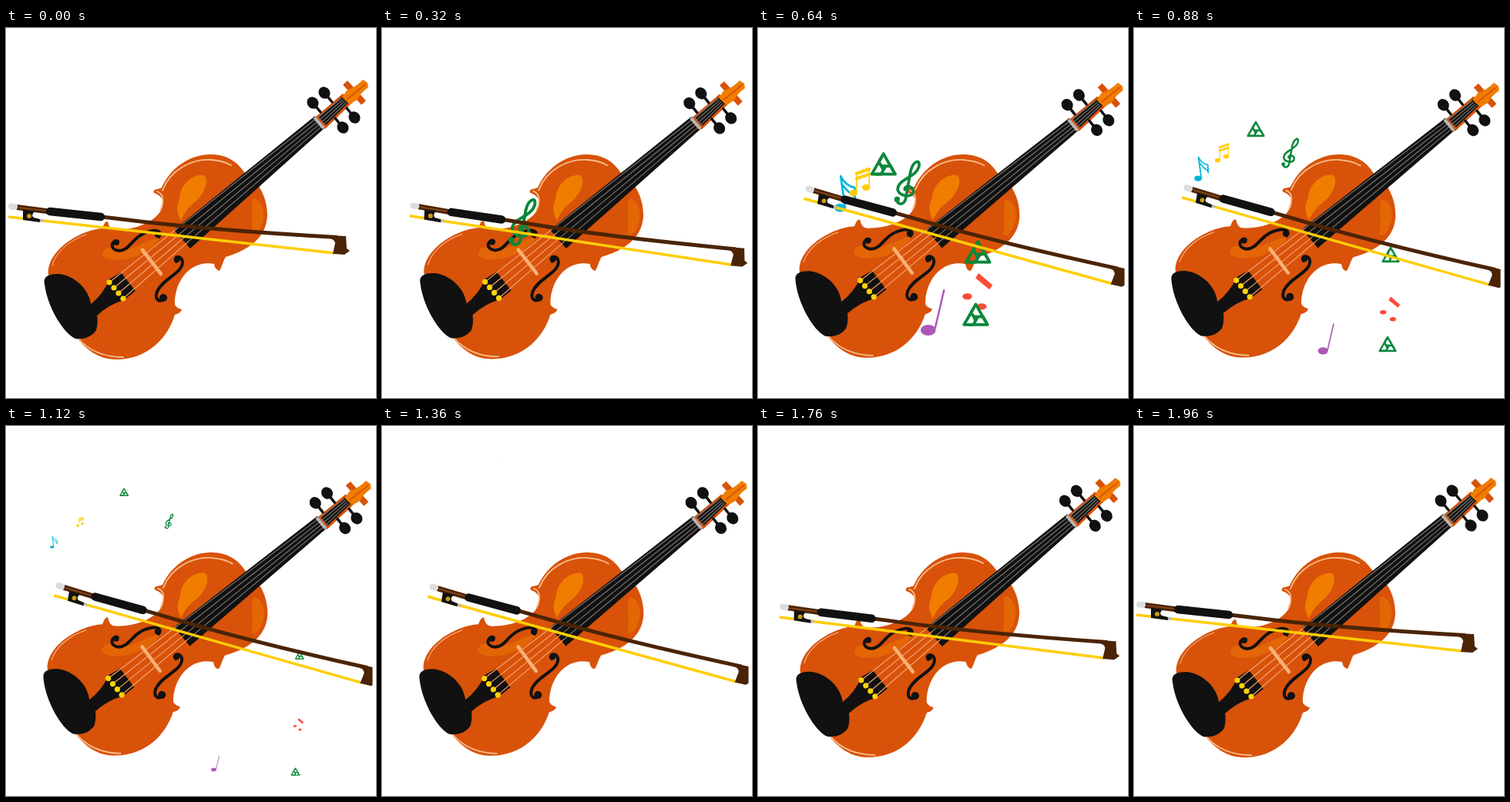
Recreate the animation shown at these times as an HTML page. Size 480x480 px, loop 2000 ms.

```html
<!DOCTYPE html>
<html lang="en">
<head>
<meta charset="utf-8">
<title>Violin</title>
<style>
  html, body { margin: 0; width: 100%; height: 100%; overflow: hidden; background: #fff; }
  svg { display: block; width: 100vw; height: 100vh; }
  .line { fill: none; stroke-linecap: round; stroke-linejoin: round; }
  .flat { stroke-linecap: butt; }
</style>
</head>
<body>
<svg viewBox="0 0 480 480">
  <defs>
    <clipPath id="edge"><rect width="475.5" height="480"/></clipPath>
    <path id="strand" class="line" d="M-3 -16L-18.7 10.8H-4L3 -1"/>
    <g id="knot" stroke="#0b873b" stroke-width="4.6">
      <use href="#strand"/>
      <use href="#strand" transform="rotate(120)"/>
      <use href="#strand" transform="rotate(240)"/>
    </g>
    <g id="clef" fill="#0b873b" transform="rotate(14)">
      <path class="line" stroke="#0b873b" stroke-width="4.5" d="M-11 31C-4 40 3 34 3 26L0 -18C0 -36 11 -42 11 -28C10 -10 -16 -2 -13 14C-9 25 13 23 12 12C10 3 -4 4 -2 12"/>
      <circle cx="-10" cy="30" r="4.5"/>
    </g>
    <g id="flagged" fill="#00b7dd">
      <ellipse cx="-9" cy="22" rx="9" ry="6.5"/>
      <path class="line" stroke="#00b7dd" stroke-width="3.2" d="M-1 22L-8 -28Q0 -12 14 -10L15 8M-5 -14Q4 -2 14 4"/>
    </g>
    <g id="beamed" fill="#ffcd05">
      <ellipse cx="-10" cy="16" rx="6.5" ry="5"/>
      <ellipse cx="10" cy="7" rx="6.5" ry="5"/>
      <path class="line" stroke="#ffcd05" stroke-width="5" d="M-5 -15L15 -22M-5 -7L15 -14"/>
      <path class="line" stroke="#ffcd05" stroke-width="2" d="M-5 14V-12M15 5V-20"/>
    </g>
    <g id="pair" fill="#fd4a37">
      <path d="M2 -30L24 -11L19 -4L-3 -22Z"/>
      <ellipse cx="-16" cy="7" rx="7.5" ry="5"/>
      <ellipse cx="7" cy="23" rx="7.5" ry="5"/>
    </g>
    <g id="quarter" fill="#ad58b8">
      <ellipse cx="-7" cy="27" rx="12" ry="8.5"/>
      <path class="line" stroke="#ad58b8" stroke-width="3" d="M4 24L18 -36"/>
    </g>
  </defs>

  <g clip-path="url(#edge)">
    <g id="violin">
      <path fill="#d8520a" d="M192 214C190 208 197 210 202 207C214 180 240 164 265 164C285 164 299 172 309 187C330 200 339 222 339 243C338 272 315 288 285 297C282 301 281 308 277 315Q271 314 270 306C240 300 218 328 219 359Q222 364 228 365Q227 370 219 372C210 402 184 430 143 430C118 430 103 415 92 402L55 320C52 290 95 262 125 260Q128 250 132 251Q134 262 142 262C170 262 197 250 203 232C205 222 201 217 192 214Z"/>
      <g fill="#f07d00">
        <path d="M225 222C226 200 245 189 257 191C264 197 258 215 246 225C236 233 231 240 227 250C222 242 220 232 225 222Z"/>
        <path opacity=".5" d="M320 221C332 222 339 240 331 258C327 266 321 271 318 266C322 252 316 234 320 221Z"/>
        <path opacity=".45" d="M125 293C126 284 137 282 150 289C166 287 180 276 200 271C192 288 166 301 144 301C132 301 125 299 125 293Z"/>
      </g>
      <g class="line" stroke="#fbbd8a" stroke-width="1.8">
        <path d="M196 212Q205 215 203 228L200 237M203 211C213 184 240 170 265 171Q282 172 292 178"/>
        <path stroke-width="1" d="M60 308C65 290 82 276 104 268"/>
        <path d="M94 403Q115 427 152 427"/>
      </g>
      <path fill="#111" d="M50 332C48 322 56 319 68 319C90 321 108 340 110 358C120 365 120 383 117 392C110 402 100 404 90 403C74 396 53 360 50 332Z"/>
      <path fill="#111" d="M108 360Q127 345 134 326L149 317L168 341L153 353Q134 358 117 374Z"/>
      <path fill="#111" d="M218 262L239 286L413 130L401 114Z"/>
      <path fill="#d8520a" d="M401 116L437 85L449 97L414 131Z"/>
      <path fill="#111" d="M406 116L436 89L444 97L415 126Z"/>
      <g class="line" stroke="#111" stroke-width="4">
        <path d="M145 277C136 275 134 288 147 289C163 288 163 268 190 263C199 262 202 266 198 271"/>
        <path d="M221 303C216 296 228 294 229 303C230 318 203 325 196 342C192 354 201 357 207 350"/>
      </g>
      <g fill="#111">
        <circle cx="143" cy="278" r="4"/><circle cx="197" cy="268" r="4"/>
        <circle cx="222" cy="300" r="4"/><circle cx="204" cy="350" r="5"/>
      </g>
      <g id="fittings" class="line"></g>
      <path class="line" stroke="#fbb075" stroke-width="4.5" d="M177 288L201 319"/>
      <path class="line flat" stroke="#bdb5b0" stroke-width="4" d="M400 116L412 130"/>
      <path class="line flat" stroke="#d8520a" stroke-width="8" d="M440 71L464 97"/>
      <path fill="#f07d00" d="M436 90L442 81Q455 76 463 67L469 71L470 77Q459 85 456 93L446 99Z"/>
      <path class="line" stroke="#d8520a" stroke-width="1.8" d="M443 92L466 73"/>
    </g>

    <g id="notes"></g>

    <g id="bow">
      <path class="line flat" stroke="#ffcd05" stroke-width="3.5" d="M3 245L426 292"/>
      <path class="line flat" stroke="#4b2406" stroke-width="7" d="M14 232.5L56 238"/>
      <path class="line flat" stroke="#4b2406" stroke-width="5" d="M120 244.5L150 248Q260 262 430 271.5"/>
      <path stroke="#8a4a1c" stroke-width="1.6" d="M16 233L52 237"/>
      <path class="line" stroke="#ddd" stroke-width="8" d="M7 231.5L11 232"/>
      <path class="line" stroke="#111" stroke-width="10.5" d="M57 238L123 245"/>
      <path fill="#4b2406" d="M420 269L441 270L442 286L446 289L439 294L424 293L427 279Q426 274 420 273Z"/>
      <path fill="#111" d="M22 236L37 238Q32 243 36 246L44 248V252L22 249Z"/>
      <path stroke="#bbb" stroke-width="4" d="M44 249.6L48 250"/>
      <circle cx="30" cy="244" r="3" fill="#c89a10"/>
    </g>
  </g>
</svg>
<script>
const $ = id => document.getElementById(id);
const clamp = v => Math.max(0, Math.min(1, v));
const smooth = v => v * v * (3 - 2 * v);
const easeOut = (v, power) => 1 - (1 - v) ** power;

// Each of the four strings has a tailpiece dot and a peg.
for (let i = 0; i < 4; i++) {
  const x = 134 + 6 * i, y = 330 + 7 * i;
  const board = `${221 + 5 * i} ${261 + 5.5 * i}`;
  const low = i > 1, far = i % 2, side = low ? -1 : 1;
  const px = 398 + 15 * far + 39 * low, py = 97 - 13 * far + 32 * low;
  $('fittings').innerHTML += `
    <path stroke="#f3a06c" stroke-width="1.2" d="M${x} ${y}L${board}"/>
    <path stroke="#77716d" stroke-width="1.2" d="M${board}L${403 + 2.5 * i} ${117 + 3.3 * i}L${435 + 2 * i} ${91 + 2 * i}"/>
    <circle cx="${x}" cy="${y}" r="3.6" fill="#ffd20a"/>
    <path stroke="#111" stroke-width="3.5" d="M${px} ${py}l${10 * side} ${12 * side}"/>
    <ellipse cx="${px}" cy="${py}" rx="7.2" ry="8" fill="#111" transform="rotate(-40 ${px} ${py})"/>`;
}

// All notes fly from one point through these places, the clef first.
const origin = [174, 290];
const notes = [
  ['clef', 203, 162], ['knot', 158, 134], ['flagged', 88, 183], ['beamed', 114, 163],
  ['knot', 333, 297], ['pair', 332, 365], ['quarter', 249, 404], ['knot', 329, 413]
];
$('notes').innerHTML = notes.map(([shape]) => `<use href="#${shape}"/>`).join('');

function drawNotes(t) {
  const way = (t - 80) / 800, shrink = clamp((1370 - t) / 890);
  notes.forEach(([, x, y], i) => {
    const birth = i ? 350 : 250, size = clamp((t - birth) / 80) * shrink;
    const nx = origin[0] + (x - origin[0]) * way, ny = origin[1] + (y - origin[1]) * way;
    $('notes').children[i].setAttribute('transform', `translate(${nx} ${ny}) scale(${size})`);
  });
}

// The bow slides out first and tilts after, then retraces its way.
function drawBow(t) {
  const u = clamp((Math.min(t, 2000 - t) - 40) / 960);
  const turn = smooth(clamp((u - .1) / .6));
  const x = 214.5 + 47.5 * easeOut(u, 3), y = 268.5 + 8 * easeOut(u, 6);
  $('bow').setAttribute('transform',
    `translate(${x} ${y}) rotate(${6.4 + 9.5 * turn}) scale(${1 - .025 * turn} 1) rotate(-6.4) translate(-214.5 -268.5)`);
  $('violin').setAttribute('transform', `rotate(${1.15 * turn} 262 262)`);
}

const start = performance.now();
function tick() {
  const t = Math.floor((performance.now() - start) % 2000 / 40) * 40;
  drawNotes(t);
  drawBow(t);
  requestAnimationFrame(tick);
}
tick();
</script>
</body>
</html>
```
